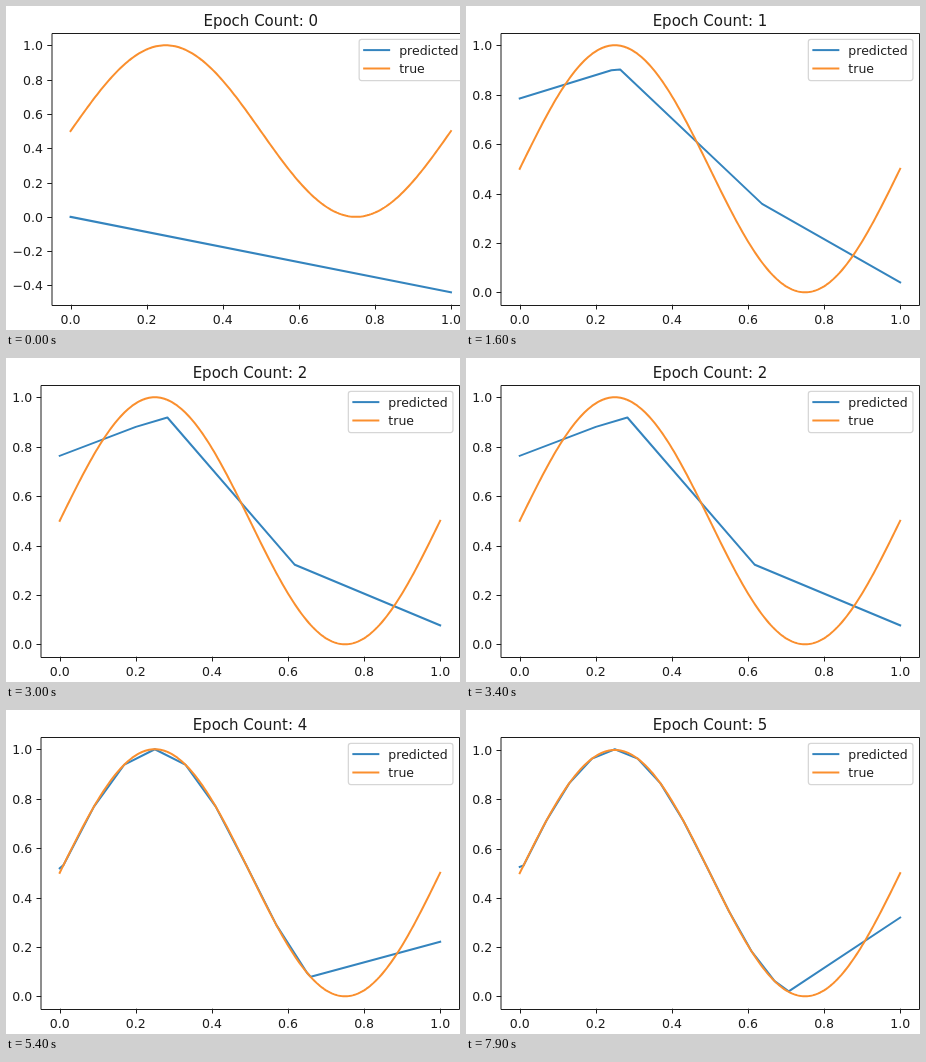
Animation of 454 by 324 pixels, one loop 8000 ms. Source, as an HTML page with a canvas:

```html
<!DOCTYPE html>
<html lang="en">
<head>
<meta charset="utf-8">
<title>Sine fit by epoch</title>
<style>
html, body { margin: 0; width: 100%; height: 100%; overflow: hidden; background: #fff; }
canvas { display: block; width: 454px; height: 324px; }
</style>
</head>
<body>
<canvas id="plot"></canvas>
<script>
const W = 454, H = 324, LOOP = 8000;
const FIRST = 100, PERIOD = 1700;
const BLUE = '#3484be', ORANGE = '#fa8f2e', INK = '#1c1c1c';
const AXES = { top: 26.9, width: 418.5, height: 271.8 };
const FONT = '"DejaVu Sans", Verdana, sans-serif';
const LINE = 2;

const wave = x => (Math.sin(2 * Math.PI * x) + 1) / 2;
const truth = Array.from({ length: 201 }, (_, i) => [i / 200, wave(i / 200)]);

// Chords along the wave, evenly spaced around its peak, then a straight tail
function chords(start, peak, step, knee, end) {
  const pts = [[0, start]];
  const before = Math.floor(.25 / step);
  for (let k = -before; .25 + k * step < knee[0]; k++) {
    const x = .25 + k * step;
    pts.push([x, k === 0 ? peak : wave(x)]);
  }
  return [...pts, knee, [1, end]];
}

// Predicted curve after each epoch
const fits = [
  [[0, 0], [1, -.44]],
  [[0, .785], [.241, .899], [.264, .902], [.637, .358], [1, .04]],
  [[0, .763], [.2, .88], [.283, .918], [.618, .322], [1, .077]],
  chords(.54, 1.01, .06, [.622, .155], .159),
  chords(.518, 1, .08, [.66, .079], .221),
  chords(.525, 1.003, .06, [.707, .02], .32)
];

const canvas = document.getElementById('plot');
const ctx = canvas.getContext('2d');
const dpr = window.devicePixelRatio || 1;
canvas.width = W * dpr;
canvas.height = H * dpr;

const snap = v => Math.round(v) + .5;

function line(pts, color, width, cap = 'butt') {
  ctx.beginPath();
  pts.forEach(([x, y]) => ctx.lineTo(x, y));
  ctx.strokeStyle = color;
  ctx.lineWidth = width;
  ctx.lineCap = cap;
  ctx.lineJoin = 'round';
  ctx.stroke();
}

function text(str, x, y, align, size = 12.5) {
  ctx.font = `${size}px ${FONT}`;
  ctx.textAlign = align;
  ctx.fillStyle = INK;
  ctx.fillText(str, x, y);
}

function legend(right) {
  const x = right - 6.25 - 104.6, y = AXES.top + 6.4;
  ctx.beginPath();
  ctx.roundRect(x, y, 104.6, 41.2, 2.5);
  ctx.fillStyle = 'rgba(255,255,255,.8)';
  ctx.fill();
  ctx.strokeStyle = 'rgba(204,204,204,.8)';
  ctx.lineWidth = 1.25;
  ctx.stroke();
  [['predicted', BLUE], ['true', ORANGE]].forEach(([name, color], i) => {
    const mid = y + 10.8 + i * 18.4;
    line([[x + 5, mid], [x + 30, mid]], color, LINE, 'square');
    text(name, x + 40, mid + 4.4, 'left');
  });
}

function draw(epoch) {
  const fit = fits[epoch];
  const { top, width, height } = AXES;
  const left = epoch === 0 ? 45.5 : 34.7;
  const right = left + width, bottom = top + height;
  const ys = fit.map(p => p[1]);
  const low = Math.min(0, ...ys), high = Math.max(1, ...ys);
  const px = x => left + width * (x + .05) / 1.1;
  const py = y => bottom - height * ((y - low) / (high - low) + .05) / 1.1;
  const toScreen = ([x, y]) => [px(x), py(y)];

  ctx.setTransform(dpr, 0, 0, dpr, 0, 0);
  ctx.fillStyle = '#fff';
  ctx.fillRect(0, 0, W, H);

  for (let i = 0; i <= 5; i++) {
    const x = snap(px(i / 5));
    line([[x, bottom], [x, bottom + 4.8]], INK, 1);
    text((i / 5).toFixed(1), px(i / 5), 318, 'center');
  }
  for (let i = Math.ceil(low * 5); i <= 5; i++) {
    const y = snap(py(i / 5));
    line([[left - 4.2, y], [left + .5, y]], INK, 1);
    text((i / 5).toFixed(1).replace('-', '\u2212'), left - 8.6, py(i / 5) + 5, 'right');
  }

  line(fit.map(toScreen), BLUE, LINE, 'square');
  line(truth.map(toScreen), ORANGE, LINE, 'square');

  const x0 = snap(left), y0 = snap(top);
  ctx.strokeStyle = INK;
  ctx.lineWidth = 1;
  ctx.strokeRect(x0, y0, snap(right) - x0, snap(bottom) - y0);
  text(`Epoch Count: ${epoch}`, left + width / 2, 20, 'center', 15);
  legend(right);
}

let shown = -1;
const start = performance.now();

function tick() {
  const t = (performance.now() - start) % LOOP;
  const epoch = t < FIRST ? 0 : 1 + Math.floor((t - FIRST) / PERIOD);
  if (epoch !== shown) draw(shown = epoch);
  requestAnimationFrame(tick);
}
tick();
</script>
</body>
</html>
```
